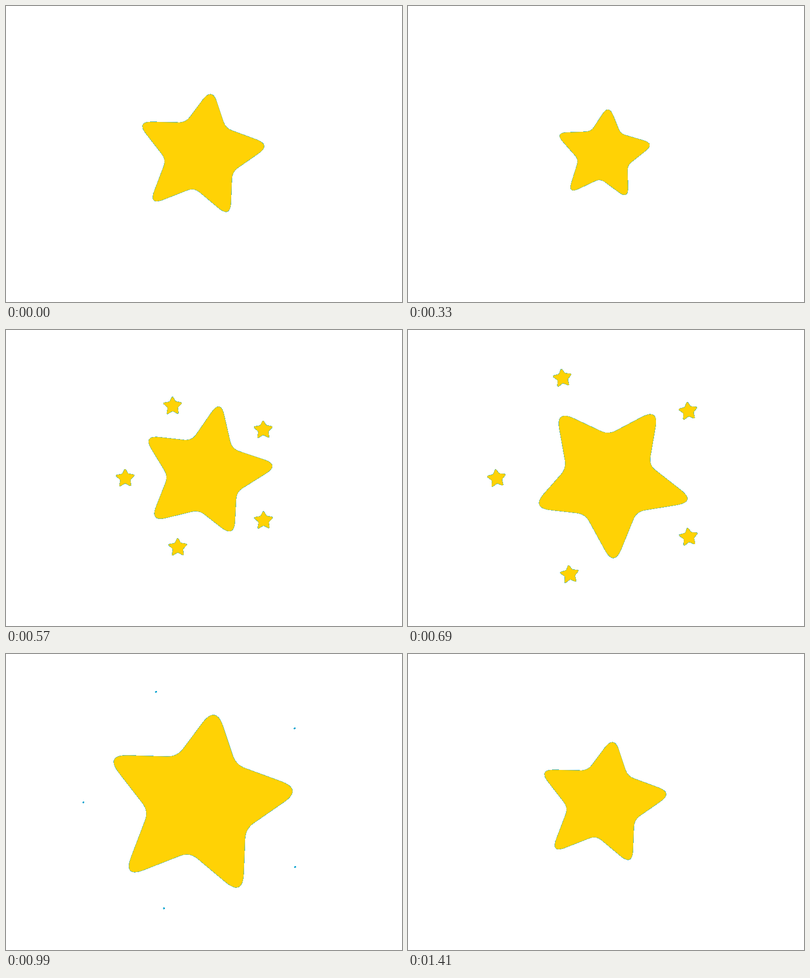
Animation of 800x600 px, one loop 1650 ms. Source, as an HTML page with a canvas:

```html
<!DOCTYPE html>
<html lang="en">
<head>
<meta charset="utf-8">
<title>Star burst</title>
<style>
  html, body { margin: 0; width: 100%; height: 100%; overflow: hidden; background: #fff; }
  canvas { display: block; }
</style>
</head>
<body>
<canvas id="stage" width="800" height="600"></canvas>
<script>
const ctx = document.getElementById('stage').getContext('2d', { willReadFrequently: true });

const LOOP = 1650, STEP = 30;
const FILL = [255, 210, 5], MATTE = [0, 162, 222];
const PIVOT = [399.4, 297];

// star corners relative to the pivot, tips and notches in turn
const CORNERS = [
  [-135.9, -63.2], [-36.5, -60.5], [16.8, -132.1], [44.3, -49.2], [136.2, -15.6],
  [57.5, 38.9], [53.8, 132.7], [-19.5, 71.1], [-111.1, 107.4], [-75.8, 14.7]
];
const CENTRE = [-7.1, 5.55];
const TIP_CUT = 32, NOTCH_CUT = 14;
const REST = 10;   // tilt of the shape above, in degrees

// [time, value] keys, eased in and out between neighbours
const SPIN = [[0, 0], [180, -20], [240, -20], [960, 360]];
const SCALE = [[0, 1], [180, 0.704], [240, 0.7], [960, 1.468], [990, 1.468], [1260, 0.74], [1410, 1]];
const SPARK_SCALE = [[690, 0.1485], [1080, 0]];
const SPARK_ALPHA = [[690, 1], [1050, 0]];
const SPARK_TILT = [[540, 0], [690, -6.5], [840, -16], [1080, -25]];

// final spark positions relative to the stage centre
const SPARKS = [[-97, -223], [183, -149], [-243.5, 1], [184, 132], [-81, 215.5]];
const BURST = { from: 440, length: 558 };

const rad = deg => deg * Math.PI / 180;
const smooth = u => u * u * (3 - 2 * u);

function at(keys, t) {
  if (t <= keys[0][0]) return keys[0][1];
  for (let i = 1; i < keys.length; i++) {
    const [t0, a] = keys[i - 1], [t1, b] = keys[i];
    if (t < t1) return a + (b - a) * smooth((t - t0) / (t1 - t0));
  }
  return keys[keys.length - 1][1];
}

function towards([x0, y0], [x1, y1], dist) {
  const k = dist / Math.hypot(x1 - x0, y1 - y0);
  return [x0 + (x1 - x0) * k, y0 + (y1 - y0) * k];
}

function makeStar() {
  const path = new Path2D(), n = CORNERS.length;
  CORNERS.forEach((p, i) => {
    const cut = i % 2 ? NOTCH_CUT : TIP_CUT;
    path.lineTo(...towards(p, CORNERS[(i + n - 1) % n], cut));
    path.quadraticCurveTo(...p, ...towards(p, CORNERS[(i + 1) % n], cut));
  });
  path.closePath();
  return path;
}

const star = makeStar();

function drawStar(x, y, scale, turn, [ax, ay] = [0, 0]) {
  ctx.save();
  ctx.translate(x, y);
  ctx.rotate(rad(turn));
  ctx.scale(scale, scale);
  ctx.translate(-ax, -ay);
  ctx.fill(star);
  ctx.restore();
}

// Hard-edged transparency: soft pixels blend into the matte colour
function flatten() {
  const x = 130, y = 50, img = ctx.getImageData(x, y, 490, 500), d = img.data;
  for (let i = 0; i < d.length; i += 4) {
    const a = d[i + 3];
    if (a === 0 || a === 255) continue;
    const k = a / 255;
    for (let c = 0; c < 3; c++) d[i + c] = FILL[c] * k + MATTE[c] * (1 - k);
    d[i + 3] = a < 10 ? 0 : 255;
  }
  ctx.putImageData(img, x, y);
}

function draw(t) {
  ctx.clearRect(0, 0, 800, 600);
  ctx.fillStyle = `rgb(${FILL})`;

  const u = (t - BURST.from) / BURST.length;
  const size = at(SPARK_SCALE, t);
  if (u > 0 && size > 0) {
    const reach = 1 - Math.pow(1 - Math.min(u, 1), 4);
    ctx.globalAlpha = at(SPARK_ALPHA, t);
    for (const [x, y] of SPARKS) {
      drawStar(400 + x * reach, 300 + y * reach, size, at(SPARK_TILT, t) - REST, CENTRE);
    }
    ctx.globalAlpha = 1;
  }

  drawStar(...PIVOT, at(SCALE, t), at(SPIN, t));
  flatten();
}

const start = performance.now();
let last = -1;

function tick() {
  const step = Math.floor(((performance.now() - start) % LOOP) / STEP);
  if (step !== last) draw((last = step) * STEP);
  requestAnimationFrame(tick);
}
tick();
</script>
</body>
</html>
```
